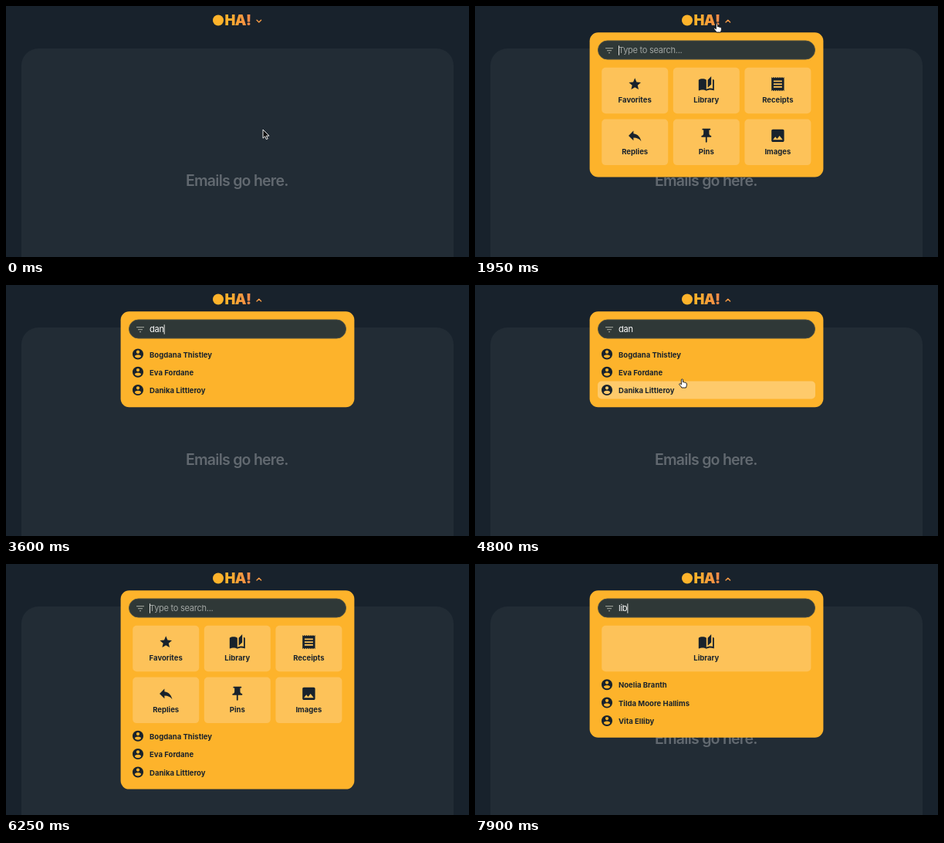
An HTML page that plays this animation: 600 px wide and 325 px high, repeating every 8000 ms.

```html
<!DOCTYPE html>
<html lang="en">
<head>
<meta charset="utf-8">
<title>Search menu</title>
<style>
  html, body { margin: 0; width: 100%; height: 100%; overflow: hidden; background: #18222c; }
  svg { display: block; width: 100vw; height: 100vh; font-family: Inter, "Open Sans", sans-serif; }
  .bold { font-weight: 700; font-size: 9.5px; letter-spacing: .02px; fill: #18222c; }
  .field { font-size: 11px; letter-spacing: -.25px; }
  .icon { fill: #18222c; }
</style>
</head>
<body>
<svg id="stage" viewBox="0 0 600 325">
  <defs>
    <linearGradient id="warm" gradientUnits="userSpaceOnUse" x1="284" y1="0" x2="321" y2="0">
      <stop offset=".15" stop-color="#fdb12c"/>
      <stop offset="1" stop-color="#f4824f"/>
    </linearGradient>
  </defs>
  <rect width="600" height="325" fill="#18222c"/>
  <rect x="20" y="55" width="560" height="320" rx="22" fill="#222c35"/>
  <text x="233" y="232.6" font-size="19.5" font-weight="600" letter-spacing="-.75" fill="#626970">Emails go here.</text>

  <circle cx="275" cy="18.5" r="7" fill="#fdb32b"/>
  <text x="283.5" y="25.4" font-size="18.5" font-weight="900" letter-spacing="-.6" fill="url(#warm)">HA!</text>
  <path id="chevron" fill="none" stroke="#f59a45" stroke-width="1.4" stroke-linecap="round" stroke-linejoin="round"/>

  <g id="panel">
    <rect id="sheet" x="148.6" y="34.3" width="302.8" rx="11" fill="#fdb32b"/>
    <g id="loader" fill="#18222c"></g>
    <g id="menu">
      <rect x="159.5" y="45" width="281" height="24" rx="12" fill="#2f3837" stroke="#4d4e40"/>
      <path d="M169 54.6h10M171 57.6h6M173 60.6h2" stroke="#92968e" stroke-width="1.1"/>
      <text id="hint" class="field" x="186" y="61.3" fill="#a0a5a3">Type to search...</text>
      <text id="query" class="field" x="186" y="61.3" fill="#fff"></text>
      <rect id="caret" y="51.3" width="1" height="12.4" fill="#e8e8e4"/>
      <g id="tiles"></g>
      <g id="wide"></g>
      <rect id="hover" x="159" width="282" height="23" rx="5" fill="#fff" fill-opacity=".3"/>
      <g id="people"></g>
    </g>
  </g>

  <g id="cursor" stroke-linejoin="round">
    <path id="arrow" d="M0 0V11.2L2.6 8.8 4.3 12.6 6.2 11.8 4.5 8.1H8Z" fill="#111" stroke="#fff" stroke-width=".9"/>
    <path id="hand" transform="scale(.95 .92)" d="M-1.2 .9C-1.2-.5 1-.5 1 .9V4.2C1.6 3.6 2.8 3.8 2.9 4.7 3.6 4.2 4.6 4.5 4.7 5.3 5.5 5 6.2 5.5 6.2 6.4V8.5C6.2 10 5.2 10.6 5.1 12H-.7C-1 10.6-3.4 8.6-4 7.2-4.3 6.2-3 5.8-2.2 6.6L-1.2 7.5Z" fill="#fff" stroke="#111"/>
    <path id="beam" d="M-2-6Q0-6 0-4.5V4.5Q0 6-2 6M2-6Q0-6 0-4.5M0 4.5Q0 6 2 6" fill="none" stroke="#fff"/>
  </g>
</svg>
<script>
const LOOP = 8000, ROW = 23.3;
const $ = id => document.getElementById(id);
const show = (id, on) => $(id).setAttribute('display', on ? 'inline' : 'none');
const set = (id, attrs) => { for (const k in attrs) $(id).setAttribute(k, attrs[k]); };
const clamp = v => Math.max(0, Math.min(1, v));
const span = (t, from, to) => clamp((t - from) / (to - from));
const easeOut = p => 1 - (1 - p) ** 3;
const easeInOut = p => p * p * (3 - 2 * p);
const mix = (a, b, p) => a + (b - a) * p;

// Icons on a 24-unit grid
const ICONS = {
  star: 'M12 17.27L18.18 21l-1.64-7.03L22 9.24l-7.19-.61L12 2 9.19 8.63 2 9.24l5.46 4.73L5.82 21z',
  book: 'M19 1l-5 5v11l5-4.5V1zM1 6v14.65c0 .25.25.5.5.5.1 0 .15-.05.25-.05C3.1 20.45 5.05 20 6.5 20c1.95 0 4.05.4 5.5 1.5V6c-1.45-1.1-3.55-1.5-5.5-1.5S2.45 4.9 1 6zm22 13.5V6c-.6-.45-1.25-.75-2-1v13.5c-1.1-.35-2.3-.5-3.5-.5-1.7 0-4.15.65-5.5 1.5v2c1.35-.85 3.8-1.5 5.5-1.5 1.65 0 3.35.3 4.75 1.05.1.05.15.05.25.05.25 0 .5-.25.5-.5z',
  receipt: 'M18 17H6v-2h12v2zm0-4H6v-2h12v2zm0-4H6V7h12v2zM3 22l1.5-1.5L6 22l1.5-1.5L9 22l1.5-1.5L12 22l1.5-1.5L15 22l1.5-1.5L18 22l1.5-1.5L21 22V2l-1.5 1.5L18 2l-1.5 1.5L15 2l-1.5 1.5L12 2l-1.5 1.5L9 2 7.5 3.5 6 2 4.5 3.5 3 2z',
  reply: 'M10 9V5l-7 7 7 7v-4.1c5 0 8.5 1.6 11 5.1-1-5-4-10-11-11z',
  pin: 'M16 9V4h1c.55 0 1-.45 1-1s-.45-1-1-1H7c-.55 0-1 .45-1 1s.45 1 1 1h1v5c0 1.66-1.34 3-3 3v2h5.97v7l1 1 1-1v-7H19v-2c-1.66 0-3-1.34-3-3z',
  image: 'M21 19V5c0-1.1-.9-2-2-2H5c-1.1 0-2 .9-2 2v14c0 1.1.9 2 2 2h14c1.1 0 2-.9 2-2zM8.5 13.5l2.5 3.01L14.5 12l4.5 6H5l3.5-4.5z',
  person: 'M12 2C6.48 2 2 6.48 2 12s4.48 10 10 10 10-4.48 10-10S17.52 2 12 2zm0 3c1.66 0 3 1.34 3 3s-1.34 3-3 3-3-1.34-3-3 1.34-3 3-3zm0 14.2c-2.5 0-4.71-1.28-6-3.22.03-1.99 4-3.08 6-3.08 1.99 0 5.97 1.09 6 3.08-1.29 1.94-3.5 3.22-6 3.22z'
};
const icon = (name, x, y, scale) =>
  `<path class="icon" d="${ICONS[name]}" transform="translate(${x} ${y}) scale(${scale}) translate(-12 -12)"/>`;

const tile = (x, y, w, label, name, scale = .91) =>
  `<rect x="${x}" y="${y}" width="${w}" height="59.5" rx="5" fill="#fdc259"/>` +
  icon(name, x + w / 2, y + 21.3, scale) +
  `<text class="bold" x="${x + w / 2}" y="${y + 45.3}" text-anchor="middle">${label}</text>`;

const TILES = [
  ['Favorites', 'star', .78], ['Library', 'book'], ['Receipts', 'receipt'],
  ['Replies', 'reply'], ['Pins', 'pin'], ['Images', 'image']
];
$('tiles').innerHTML = TILES.map(([label, name, scale], i) =>
  tile(164.2 + i % 3 * 92.6, 79.8 + Math.floor(i / 3) * 66.8, 86, label, name, scale)).join('');
$('wide').innerHTML = tile(164.2, 79.8, 271.2, 'Library', 'book');
$('loader').innerHTML = '<circle cy="61.7"/>'.repeat(3);

const FIRST = ['Bogdana Thistley', 'Eva Fordane', 'Danika Littleroy'];
const SECOND = ['Noelia Branth', 'Tilda Moore Hallims', 'Vita Elliby'];

// Menu contents over time; y is the centre of the first person row
const VIEWS = [
  { at: 1900, tiles: true, people: [], y: 0, bottom: 221.5 },
  { at: 3000, people: FIRST, y: 89.5, bottom: 158.2 },
  { at: 5700, tiles: true, people: FIRST, y: 222.8, bottom: 291.6 },
  { at: 7700, wide: true, people: SECOND, y: 156.3, bottom: 224.8 }
];
const TYPING = [
  [0, ''], [2750, 'd'], [3050, 'da'], [3400, 'dan'],
  [5700, ''], [7150, 'l'], [7350, 'li'], [7700, 'lib']
];
const CARET_OFF = [[2400, 2750], [3800, 4300], [4800, 5300], [6350, 6850]];
const latest = (list, t, key) => list.filter(e => key(e) <= t).pop();

let shown = null;
function drawMenu(view) {
  if (view === shown) return;
  shown = view;
  show('tiles', view.tiles);
  show('wide', view.wide);
  $('people').innerHTML = view.people.map((name, i) => {
    const y = view.y + i * ROW;
    return icon('person', 171, y, .7) + `<text class="bold" x="186" y="${y + 4.1}">${name}</text>`;
  }).join('');
}

function cursorAt(t) {
  if (t < 2750) {
    const p = easeInOut(span(t, 200, 950));
    return [mix(333, 313.5, p), mix(160, 23, p)];
  }
  const down = easeInOut(span(t, 4000, 4750)), up = easeInOut(span(t, 5000, 5600));
  return [mix(313.5, 268.5, down), mix(23, 122, down) - 36 * up];
}

function drawCursor(t, view) {
  const visible = t < 2750 || (t >= 4000 && t < 5700);
  const [x, y] = cursorAt(t);
  const row = Math.floor((y + 3 - 78) / ROW);
  const onRow = t >= 4000 && visible && row >= 0 && row < 3;
  const onField = t >= 4000 && y > 44 && y < 70;
  const onLogo = y < 30;
  show('cursor', visible);
  set('cursor', { transform: `translate(${x} ${y})` });
  show('hand', onRow || onLogo);
  show('beam', onField);
  show('arrow', !onRow && !onLogo && !onField);
  show('hover', onRow);
  if (onRow) set('hover', { y: view.y - 11.6 + row * ROW });
}

function draw(t) {
  const view = latest(VIEWS, t, v => v.at);
  set('chevron', { d: view ? 'M325 21l2.8-2.8 2.8 2.8' : 'M325 18.2l2.8 2.8 2.8-2.8' });
  show('panel', t >= 1050);
  show('loader', !view);
  show('menu', view);

  const enter = easeOut(span(t, 1050, 1250)), s = mix(.95, 1, enter);
  set('panel', {
    transform: `translate(300 62) scale(${s}) translate(-300 -62)`,
    opacity: mix(.5, 1, enter)
  });
  set('sheet', { height: (view ? view.bottom : 89.6) - 34.3 });

  if (view) {
    const text = latest(TYPING, t, e => e[0])[1];
    drawMenu(view);
    $('query').textContent = text;
    show('hint', !text);
    set('caret', { x: 186 + (text ? $('query').getComputedTextLength() : 0) });
    show('caret', !CARET_OFF.some(([a, b]) => t >= a && t < b));
  } else {
    [...$('loader').children].forEach((dot, i) => {
      const wave = Math.cos((t - 1150) / 800 * 2 * Math.PI + (1 - i) * .9);
      dot.setAttribute('cx', 284 + i * 15.8);
      dot.setAttribute('r', 4.3 + .4 * wave);
    });
  }
  drawCursor(t, view);
}

const start = performance.now();
function tick() {
  draw((performance.now() - start) % LOOP);
  requestAnimationFrame(tick);
}
tick();
</script>
</body>
</html>
```
